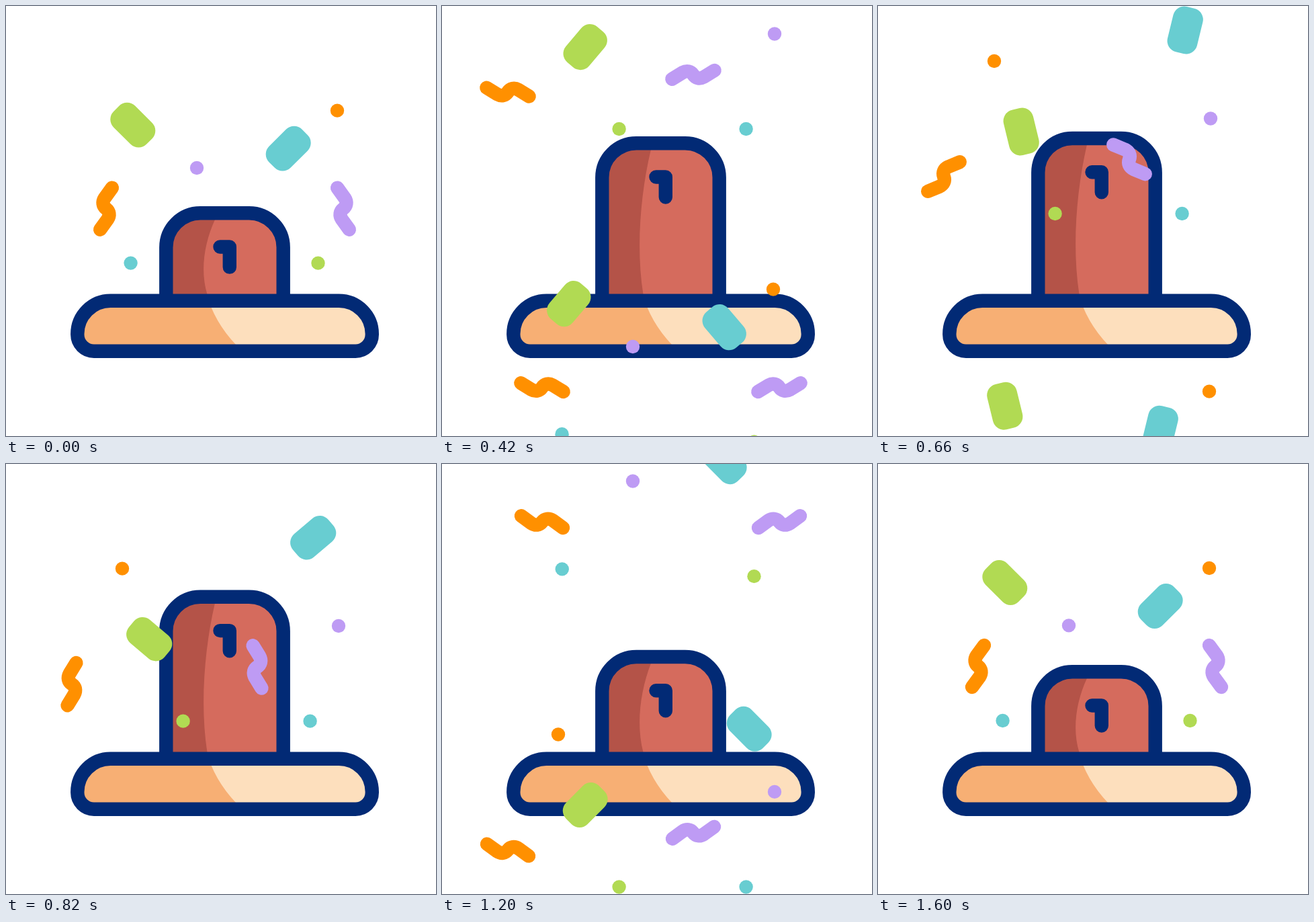
Animation, 640 px wide and 640 px high, one loop 1620 ms. Source, as an HTML page with a canvas:

```html
<!DOCTYPE html>
<html lang="en">
<head>
<meta charset="utf-8">
<title>Party hat</title>
<style>
  html, body { margin: 0; height: 100%; overflow: hidden; background: #fff; }
  canvas { display: block; }
</style>
</head>
<body>
<canvas id="stage" width="640" height="640"></canvas>
<script>
const ctx = document.getElementById('stage').getContext('2d');
const LOOP = 1620, CYCLE = 1600, HALF = 800, RESUME = 820;
const NAVY = '#022a75', GREEN = '#b1da53', TEAL = '#68cdd1', ORANGE = '#ff9000', PURPLE = '#be9bf4';
const STROKE = 20.4;

// Confetti: wave 0 is on stage when the loop starts, wave 1 enters from above.
// x, y is the resting point; rise and fall are the distances above and below it.
const confetti = [
  { wave: 0, kind: 'dot', color: ORANGE, x: 493, y: 155 },
  { wave: 0, kind: 'dot', color: PURPLE, x: 284, y: 240.4 },
  { wave: 0, kind: 'dot', color: TEAL, x: 185.6, y: 382, rise: 441, fall: 485, drift: -13.4 },
  { wave: 0, kind: 'dot', color: GREEN, x: 464.5, y: 382 },
  { wave: 0, kind: 'card', color: GREEN, x: 188.8, y: 176.5, spin: -1 },
  { wave: 0, kind: 'card', color: TEAL, x: 420.2, y: 211.5, spin: 1 },
  { wave: 0, kind: 'ribbon', color: ORANGE, x: 149, y: 301, spin: -1 },
  { wave: 0, kind: 'ribbon', color: PURPLE, x: 502, y: 301, spin: 1 },
  { wave: 1, kind: 'dot', color: ORANGE, x: 173, y: 155 },
  { wave: 1, kind: 'dot', color: PURPLE, x: 495, y: 240.4 },
  { wave: 1, kind: 'dot', color: TEAL, x: 452.6, y: 382 },
  { wave: 1, kind: 'dot', color: GREEN, x: 263.6, y: 382 },
  { wave: 1, kind: 'card', color: GREEN, x: 213.2, y: 260, spin: -1 },
  { wave: 1, kind: 'card', color: TEAL, x: 457.2, y: 109, fall: 584, spin: 1 },
  { wave: 1, kind: 'ribbon', color: ORANGE, x: 98, y: 327, spin: -1 },
  { wave: 1, kind: 'ribbon', color: PURPLE, x: 374, y: 301.3, spin: 1 }
];

const dot = new Path2D();
dot.arc(0, 0, 10.2, 0, 7);
const card = new Path2D();
card.roundRect(-34.6, -22.6, 69.2, 45.2, 16.8);
const ribbon = new Path2D('M9-31L-2-16C-6-10-5-4 0 0C5 4 6 10 2 16L-9 31');
const digit = new Path2D('M318.5 359.5H332.8V389.6');
const brim = new Path2D('M155.6 438.8H495.5a49.3 49.3 0 0 1 49.3 49.3v1a24.6 24.6 0 0 1-24.6 24.6H130.9' +
  'a24.6 24.6 0 0 1-24.6-24.6v-1a49.3 49.3 0 0 1 49.3-49.3z');
const brimShade = new Path2D('M90 430H299Q312 476 351 513V530H90z');

function bezier(x1, y1, x2, y2) {
  const axis = (a, b, s) => 3 * a * s * (1 - s) ** 2 + 3 * b * s * s * (1 - s) + s ** 3;
  return p => {
    let lo = 0, hi = 1;
    for (let i = 0; i < 30; i++) {
      const mid = (lo + hi) / 2;
      if (axis(x1, x2, mid) < p) lo = mid; else hi = mid;
    }
    return axis(y1, y2, lo);
  };
}
const popUp = bezier(.12, .8, .4, 1);
const settle = bezier(.25, .1, .25, 1);

function fillStroke(path, base, shade, shadeColor) {
  ctx.fillStyle = base;
  ctx.fill(path);
  ctx.save();
  ctx.clip(path);
  ctx.fillStyle = shadeColor;
  ctx.fill(shade);
  ctx.restore();
  ctx.stroke(path);
}

function drawHat(t) {
  const lift = 113 * (t < HALF ? popUp(t / HALF) : 1 - settle((t - HALF) / HALF));
  const top = 309.2 - lift, side = top + 51;
  const crown = new Path2D(`M238.3 440V${side}a51 51 0 0 1 51-51H361.7a51 51 0 0 1 51 51V440z`);
  const inner = top + 10.2, height = 429 - inner;
  const shade = new Path2D(`M230 ${top - 10}H313L310.8 ${inner}C295.5 ${inner + height * .3} ` +
    `288.5 ${inner + height * .68} 299.5 429V440H230z`);
  ctx.lineWidth = STROKE;
  ctx.strokeStyle = NAVY;
  ctx.lineCap = ctx.lineJoin = 'round';
  fillStroke(crown, '#d56b5d', shade, '#b45348');
  ctx.save();
  ctx.translate(0, -lift);
  ctx.stroke(digit);
  ctx.restore();
  fillStroke(brim, '#fddfbd', brimShade, '#f7af74');
}

// Progress from -1 (above) through 0 (resting point) to 1 (below).
function travel(wave, t) {
  const first = Math.min(t / HALF, 1);
  const second = Math.max((t - RESUME) / (CYCLE - RESUME), 0);
  if (wave) return t < RESUME ? first - 1 : second;
  return t < RESUME ? first : second - 1;
}

function drawPiece({ wave, kind, color, x, y, rise = 420, fall = 506.7, drift = 0, spin = 0 }, t) {
  const p = travel(wave, t);
  ctx.save();
  ctx.translate(x + drift * Math.abs(p), y + p * (p < 0 ? rise : fall));
  ctx.rotate(spin * t / CYCLE * 2 * Math.PI);
  ctx.fillStyle = ctx.strokeStyle = color;
  if (kind === 'dot') ctx.fill(dot);
  if (kind === 'card') {
    ctx.rotate(-spin * Math.PI / 4);
    ctx.fill(card);
  }
  if (kind === 'ribbon') {
    ctx.scale(-spin, 1);
    ctx.stroke(ribbon);
  }
  ctx.restore();
}

const start = performance.now();
function draw() {
  const t = Math.min((performance.now() - start) % LOOP, CYCLE);
  ctx.fillStyle = '#fff';
  ctx.fillRect(0, 0, 640, 640);
  drawHat(t);
  for (const piece of confetti) drawPiece(piece, t);
  requestAnimationFrame(draw);
}
draw();
</script>
</body>
</html>
```
